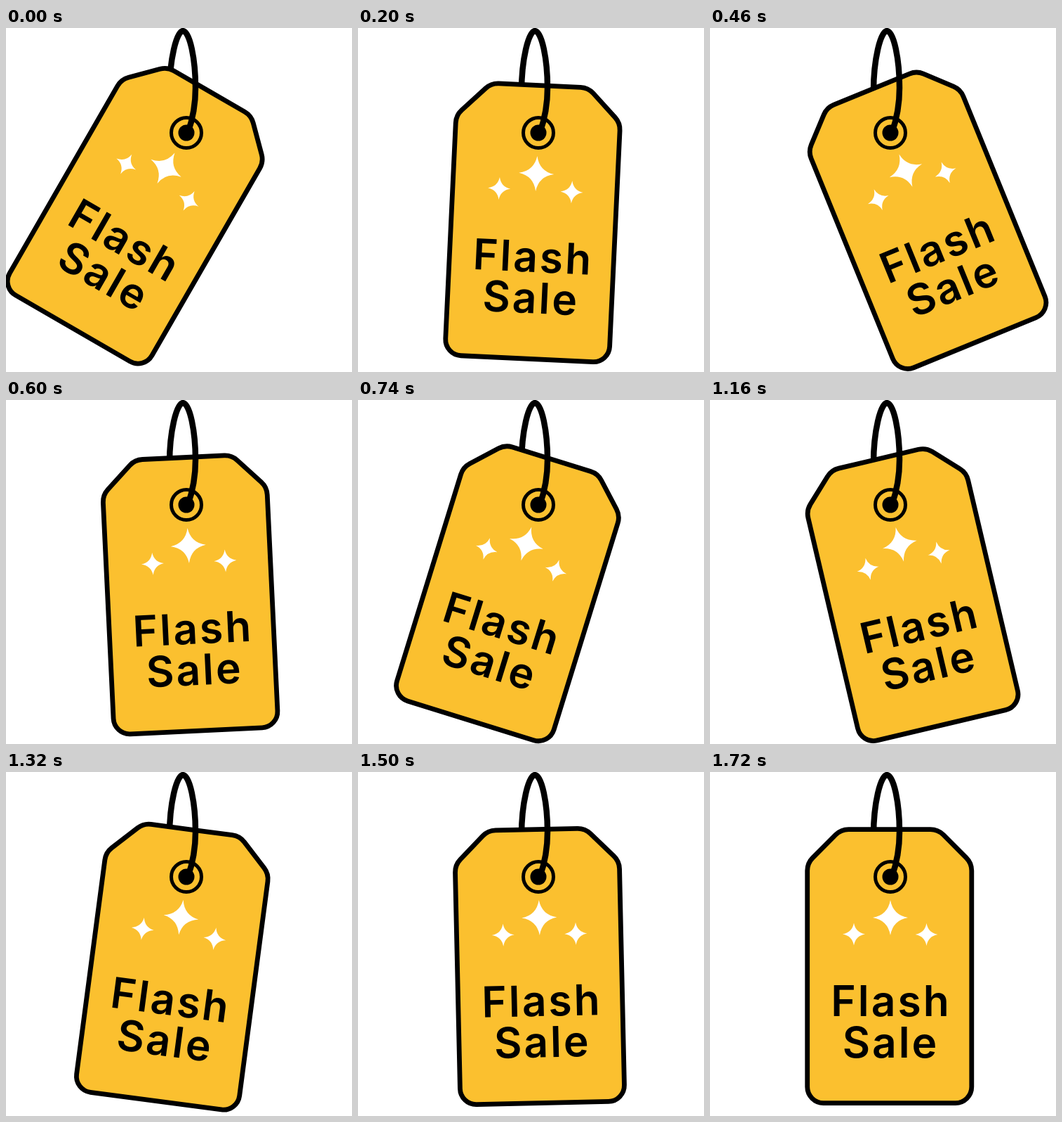
Animation of 493x489 px, one loop 2260 ms. Source, as an HTML page with a canvas:

```html
<!DOCTYPE html>
<html lang="en">
<head>
<meta charset="utf-8">
<title>Flash Sale</title>
<style>
  html, body { margin: 0; width: 100%; height: 100%; overflow: hidden; background: #fff; }
  canvas { display: block; width: 493px; height: 489px; }
</style>
</head>
<body>
<canvas id="stage" width="493" height="489"></canvas>
<script>
const ctx = document.getElementById('stage').getContext('2d');
const LOOP = 2260, STEP = 20;
const YELLOW = '#fbc02f';
const PIVOT = { x: 257, y: 149 };

// Turning points of the swing: [ms, degrees]
const SWING = [[0, 30], [400, -24.6], [805, 20], [1120, -15], [1350, 8.5], [1535, -2.2], [1720, 0]];

function angleAt(t) {
  const i = SWING.findIndex(([time]) => time > t);
  if (i < 0) return 0;
  const [t0, a0] = SWING[i - 1], [t1, a1] = SWING[i];
  const ease = (1 - Math.cos(Math.PI * (t - t0) / (t1 - t0))) / 2;
  return a0 + (a1 - a0) * ease;
}

function stroke(width) {
  ctx.strokeStyle = '#000';
  ctx.lineWidth = width;
  ctx.stroke();
}

function circle(r) {
  ctx.beginPath();
  ctx.arc(PIVOT.x, PIVOT.y, r, 0, Math.PI * 2);
}

function star(x, y, r) {
  const c = r * 0.15;
  ctx.beginPath();
  ctx.moveTo(x, y - r);
  ctx.quadraticCurveTo(x + c, y - c, x + r, y);
  ctx.quadraticCurveTo(x + c, y + c, x, y + r);
  ctx.quadraticCurveTo(x - c, y + c, x - r, y);
  ctx.quadraticCurveTo(x - c, y - c, x, y - r);
  ctx.fillStyle = '#fff';
  ctx.fill();
}

function label(text, x, y) {
  ctx.font = '600 60.5px Inter, sans-serif';
  ctx.letterSpacing = '3px';
  ctx.textAlign = 'center';
  ctx.fillStyle = '#000';
  ctx.fillText(text, x, y);
}

function tagPath() {
  const l = 138.7, r = 372.8, top = 81.6, bottom = 470.6, cut = 48;
  ctx.beginPath();
  ctx.moveTo((l + r) / 2, top);
  ctx.arcTo(r - cut, top, r, top + cut, 26);
  ctx.arcTo(r, top + cut, r, bottom, 26);
  ctx.arcTo(r, bottom, l, bottom, 23);
  ctx.arcTo(l, bottom, l, top + cut, 23);
  ctx.arcTo(l, top + cut, l + cut, top, 26);
  ctx.arcTo(l + cut, top, r, top, 26);
  ctx.closePath();
}

function drawTag(degrees) {
  ctx.save();
  ctx.translate(PIVOT.x, PIVOT.y);
  ctx.rotate(degrees * Math.PI / 180);
  ctx.translate(-PIVOT.x, -PIVOT.y);
  tagPath();
  ctx.fillStyle = YELLOW;
  ctx.fill();
  stroke(6.8);
  star(257, 207, 25);
  star(205, 230.5, 16);
  star(308.5, 231, 16);
  label('Flash', 258, 347);
  label('Sale', 257.5, 405.5);
  ctx.restore();
}

function cordBack() {
  ctx.beginPath();
  ctx.moveTo(252, 4.3);
  ctx.bezierCurveTo(243, 4.3, 233, 45, 233, 90);
  stroke(8.5);
}

function cordFront() {
  ctx.beginPath();
  ctx.moveTo(252, 4.3);
  ctx.bezierCurveTo(262, 4.3, 270, 45, 270, 85);
  ctx.bezierCurveTo(270, 110, 266, 130, 259, 149);
  stroke(8.5);
}

function draw(t) {
  ctx.fillStyle = '#fff';
  ctx.fillRect(0, 0, 493, 489);
  ctx.lineCap = 'round';
  cordBack();
  drawTag(angleAt(t));
  circle(21.5);
  stroke(5);
  circle(11.5);
  ctx.fillStyle = '#000';
  ctx.fill();
  cordFront();
}

const start = performance.now();
function tick() {
  const t = (performance.now() - start) % LOOP;
  draw(Math.floor(t / STEP) * STEP);
  requestAnimationFrame(tick);
}
tick();
</script>
</body>
</html>
```
